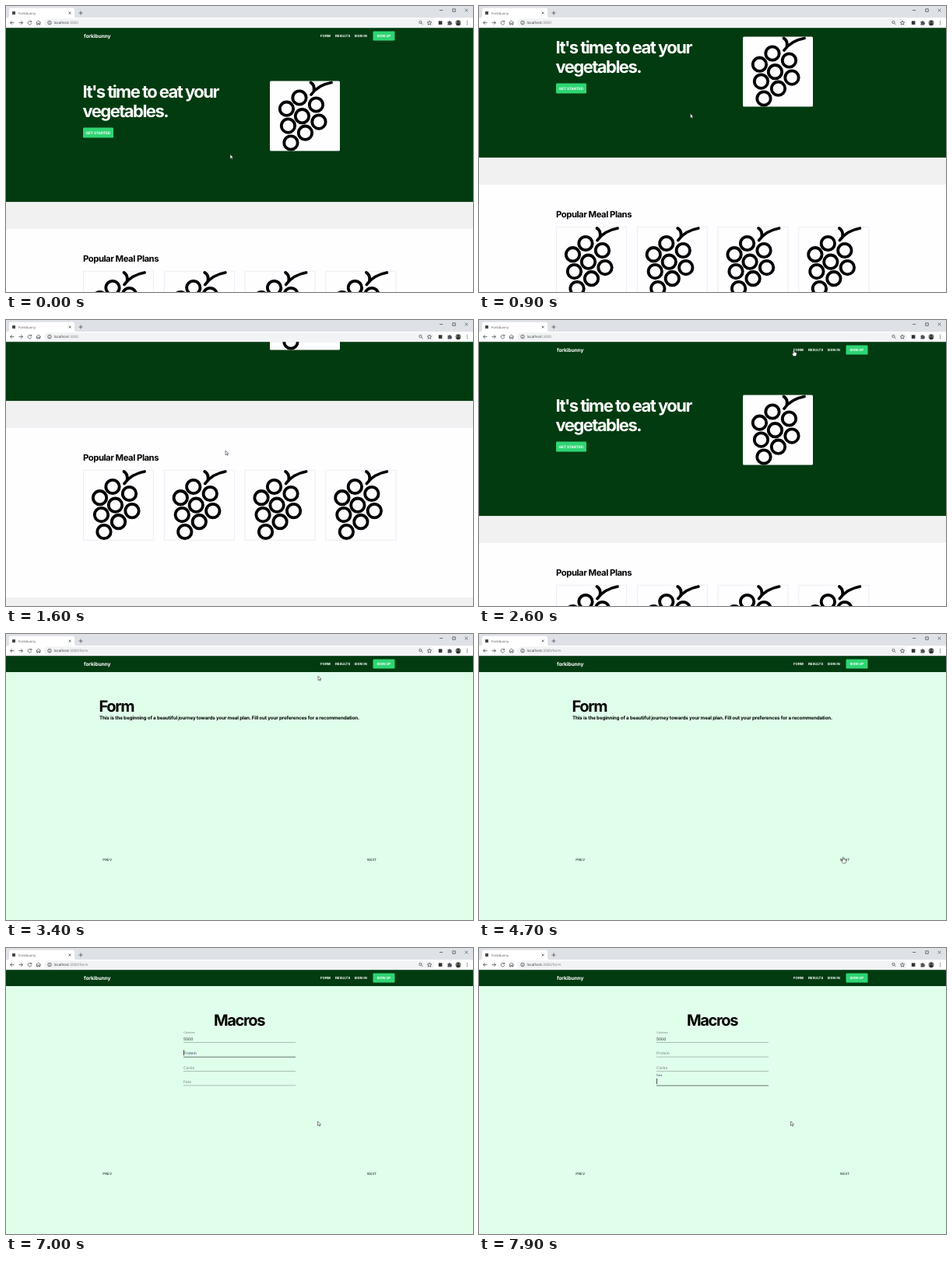
These frames come from a looping animation (600 px wide and 368 px high, 8 s). An HTML page:

```html
<!DOCTYPE html>
<html lang="en">
<head>
<meta charset="utf-8">
<title>Forkibunny</title>
<style>
  html, body { margin: 0; width: 100%; height: 100%; overflow: hidden; background: #fefefe; }
  svg { display: block; }
  text { font-family: Inter, sans-serif; text-rendering: geometricPrecision; white-space: pre; }
  .hero { font-size: 22px; font-weight: 700; letter-spacing: -.07em; fill: #fff; }
  .title { font-size: 20px; font-weight: 700; letter-spacing: -.068em; }
  .brand { font-size: 6.6px; font-weight: 700; letter-spacing: -.015em; }
  .link { font-size: 4.35px; font-weight: 700; }
  .step { font-size: 4.4px; font-weight: 500; letter-spacing: .03em; fill: #2c3830; }
  .field { font-size: 5px; }
  .ui { font-family: "Open Sans", sans-serif; font-size: 4.67px; }
  .line { fill: none; stroke: #50545a; stroke-width: .8; }
</style>
</head>
<body>
<svg width="600" height="368" viewBox="0 0 600 368">
  <defs>
    <g id="grapes" fill="none" stroke="#000" stroke-width="3.8" stroke-linecap="round">
      <path d="M53 17.5Q62 5 79 2M52.5 2Q58 5 56.5 13"/>
    </g>
    <g id="nav" fill="#fff">
      <rect y="28" width="600" height="21" fill="#023b10"/>
      <text class="brand" x="100" y="41">forkibunny</text>
      <rect x="471.5" y="32.5" width="28" height="12" rx="1.2" fill="#2ed573"/>
      <g class="link">
        <text x="404" y="40.1">FORM</text>
        <text x="423" y="40.1">RESULTS</text>
        <text x="447.5" y="40.1">SIGN IN</text>
        <text x="476.5" y="40.1">SIGN UP</text>
      </g>
    </g>
  </defs>

  <g id="home">
    <rect y="28" width="600" height="560" fill="#fefdff"/>
    <rect y="28" width="600" height="224.3" fill="#023b10"/>
    <use href="#nav"/>
    <text class="hero" x="98.5" y="117.5">It's time to eat your</text>
    <text class="hero" x="98.5" y="142.5">vegetables.</text>
    <rect x="99" y="156.5" width="39" height="13" rx="1.2" fill="#2ed573"/>
    <text class="link" x="102.5" y="164.7" style="font-size:4.6px" fill="#fff">GET STARTED</text>
    <rect x="339" y="96.5" width="90" height="90" rx="1.5" fill="#fefdff"/>
    <use href="#grapes" x="339" y="96.5"/>
    <rect y="252.3" width="600" height="34.4" fill="#f1f1f2"/>
    <text x="99" y="329" font-size="11.3" font-weight="700" letter-spacing="-.45">Popular Meal Plans</text>
    <g id="cards"></g>
    <rect y="505" width="600" height="80" fill="#f1f1f2"/>
  </g>

  <g id="form">
    <rect y="28" width="600" height="340" fill="#e0ffea"/>
    <use href="#nav"/>
    <g id="intro">
      <text class="title" x="119.5" y="99.7">Form</text>
      <text x="120" y="110.3" font-size="6.25" font-weight="700" letter-spacing="-.144">This is the beginning of a beautiful journey towards your meal plan. Fill out your preferences for a recommendation.</text>
    </g>
    <g id="macros">
      <text class="title" x="299.5" y="99.7" text-anchor="middle">Macros</text>
      <g id="fields"></g>
      <text class="field" id="value" x="228" y="118.8" fill="#222"></text>
      <rect id="caret" width=".8" height="7" fill="#222"/>
    </g>
    <text class="step" x="124.2" y="291.5">PREV</text>
    <text class="step" x="464" y="291.5">NEXT</text>
  </g>

  <g id="browser">
    <rect width="600" height="15.2" fill="#dee1e6"/>
    <path d="M1 15.2Q4 15.2 4 12V5Q4 2.8 6.2 2.8H85.8Q88 2.8 88 5V12Q88 15.2 91 15.2Z" fill="#fff"/>
    <rect y="15" width="600" height="13" fill="#fff"/>
    <rect y="27.6" width="600" height=".6" fill="#d5d8dc"/>
    <rect x="8" y="7" width="4" height="4" fill="#4a4a4a"/>
    <text class="ui" x="16" y="10.8" style="font-size:4.2px" fill="#555">Forkibunny</text>
    <path class="line" d="M80.6 7.6l2.8 2.8m0-2.8l-2.8 2.8M93.5 9h5m-2.5-2.5v5M557 5.5h4.2M573.8 3.8h3.5v3.5h-3.5zM589.7 3.7l3.6 3.6m0-3.6l-3.6 3.6"/>
    <rect x="49" y="16.2" width="501" height="10.6" rx="5.3" fill="#f1f3f4"/>
    <path class="line" d="M10.5 21.5h-5l2.3-2.3m-2.3 2.3l2.3 2.3M16.5 21.5h5l-2.3-2.3m2.3 2.3l-2.3 2.3M32.3 19.9a2.4 2.4 0 1 0 .6 2.2m-.1-3.3v1.8h-1.8M38.7 21.6l3-2.6 3 2.6m-5.1-.6v3h1.4v-1.8h1.4v1.8h1.4v-3"/>
    <g class="line" stroke-width=".6">
      <circle cx="56" cy="21.5" r="2.3"/>
      <path d="M56 20.2v.5m0 .6v1.6M533.6 22.1l1.8 1.8"/>
      <circle cx="532.4" cy="20.9" r="1.6"/>
      <path d="M544 18.9l.8 1.8 2 .2-1.5 1.3.4 1.9-1.7-1-1.7 1 .4-1.9-1.5-1.3 2-.2z"/>
    </g>
    <text class="ui" x="61.5" y="23.2" fill="#33363a">localhost<tspan fill="#74787d">:3000<tspan id="path">/form</tspan></tspan></text>
    <rect x="555.8" y="19.3" width="4.6" height="4.6" fill="#333"/>
    <path d="M567.4 20h1.5a1 1 0 0 1 2 0h1.3v1.4a1 1 0 0 1 0 2v1h-4.8v-1.4a.9.9 0 0 0 0-1.6z" fill="#50545a"/>
    <circle cx="581" cy="21.5" r="3.5" fill="#737a72"/>
    <path d="M578.5 24a2.5 2.5 0 0 1 5 0a3.5 3.5 0 0 1-5 0z" fill="#2d302e"/>
    <circle cx="581" cy="20.3" r="1.3" fill="#2d302e"/>
    <path d="M592.5 19.1v1m0 1v1m0 1v1" stroke="#50545a"/>
  </g>

  <g id="pointer" fill="#fff" stroke="#333" stroke-width=".6" stroke-linejoin="round">
    <path id="arrow" d="M0 0V5.6L1.4 4.4 2.3 6.3 3.1 5.9 2.3 4.1H4Z"/>
    <path id="hand" d="M-.8.6Q0-.6.8.6V3L3.6 3.6Q4 6 2.8 8H-.6Q-2 6-2.4 4.4-1.6 3.8-.8 5Z"/>
  </g>
</svg>

<script>
const LOOP = 8000, STEP = 100;
const $ = id => document.getElementById(id);
const show = (id, on) => $(id).setAttribute('display', on ? 'inline' : 'none');
const clamp = v => Math.max(0, Math.min(1, v));

// Keys are [time, ...values], joined by straight lines.
const scrollKeys = [[800, 0], [900, 57], [1000, 110], [1100, 150], [1200, 180], [1300, 197],
  [1400, 205], [1500, 205], [1600, 148], [1800, 60], [2000, 12], [2200, 0]];
const pointerKeys = [[0, 288, 191], [300, 284.5, 137], [400, 284.5, 137], [700, 271.5, 138.5],
  [1400, 271.5, 138.5], [1600, 282, 168], [2400, 398, 58], [2600, 404.5, 38.5], [2900, 482, 38],
  [3100, 482, 38], [3300, 406, 39], [3400, 401, 54], [4300, 440, 230], [4700, 468, 287],
  [5100, 468, 287], [5550, 345, 117], [5800, 354.5, 128], [6200, 354.5, 128], [7000, 400.5, 223]];
const FORM_AT = 3400, MACROS_AT = 4800;
const focusTimes = [5550, 7000, 7400, 7750];
const typeTimes = [6000, 6200, 6300, 6400];

function at(keys, t) {
  const i = keys.findIndex(k => k[0] > t);
  if (i === 0) return keys[0].slice(1);
  if (i < 0) return keys[keys.length - 1].slice(1);
  const a = keys[i - 1], b = keys[i], p = (t - a[0]) / (b[0] - a[0]);
  return a.slice(1).map((v, j) => v + (b[j + 1] - v) * p);
}

$('grapes').innerHTML += [[38, 21.5], [59.5, 30.5], [21.5, 35.7], [41.5, 45.2], [63, 52.6],
  [23.5, 57.6], [45.5, 66.7], [27, 79.5]]
  .map(([x, y]) => `<circle cx="${x}" cy="${y}" r="8.7"/>`).join('');

$('cards').innerHTML = [0, 1, 2, 3].map(i => {
  const x = 99 + i * 103.8;
  return `<rect x="${x + .5}" y="341.2" width="90" height="90" fill="none" stroke="#e9e9ea" stroke-width=".8"/>
    <use href="#grapes" x="${x}" y="341"/>`;
}).join('');

const lineY = i => 121.8 + i * 18.4;
$('fields').innerHTML = ['Calories', 'Protein', 'Carbs', 'Fats'].map((name, i) =>
  `<text class="field" id="label${i}">${name}</text>
   <rect id="line${i}" x="228" y="${lineY(i) - .4}" width="144"/>`).join('');

function drawFields(t) {
  const typed = typeTimes.filter(k => k <= t).length;
  const focus = focusTimes.filter(k => k <= t).length - 1;
  focusTimes.forEach((start, i) => {
    const end = focusTimes[i + 1] ?? Infinity;
    const rise = clamp((t - start) / 150) - (i ? clamp((t - end) / 150) : 0);
    const ease = rise * rise * (3 - 2 * rise);
    const active = i === focus;
    $('label' + i).setAttribute('transform',
      `translate(228 ${lineY(i) - 3 - 8.6 * ease}) scale(${1 - .25 * ease})`);
    $('label' + i).setAttribute('fill', active ? '#35406f' : '#748579');
    $('line' + i).setAttribute('height', active ? .9 : .6);
    $('line' + i).setAttribute('fill', active ? '#58685f' : '#829488');
  });
  $('value').textContent = '5000'.slice(0, typed);
  const last = Math.max(...[...focusTimes, ...typeTimes].filter(k => k <= t));
  show('caret', focus >= 0 && (t - last) % 1060 < 530);
  $('caret').setAttribute('x', 228 + (focus ? 0 : typed * 3));
  $('caret').setAttribute('y', lineY(Math.max(focus, 0)) - 9);
}

function draw(now) {
  const t = Math.floor(now % LOOP / STEP) * STEP;
  const onForm = t >= FORM_AT, onMacros = t >= MACROS_AT;
  const [scroll] = at(scrollKeys, t), [x, y] = at(pointerKeys, t);
  show('home', !onForm);
  show('form', onForm);
  show('path', onForm);
  show('intro', !onMacros);
  show('macros', onMacros);
  $('home').setAttribute('transform', `translate(0 ${-scroll})`);
  drawFields(t);
  const overLink = onForm ? x > 456 && y > 281 : x > 402 && y < 46;
  $('pointer').setAttribute('transform', `translate(${x} ${y})`);
  show('arrow', !overLink);
  show('hand', overLink);
  requestAnimationFrame(() => draw(performance.now()));
}
draw(0);
</script>
</body>
</html>
```
